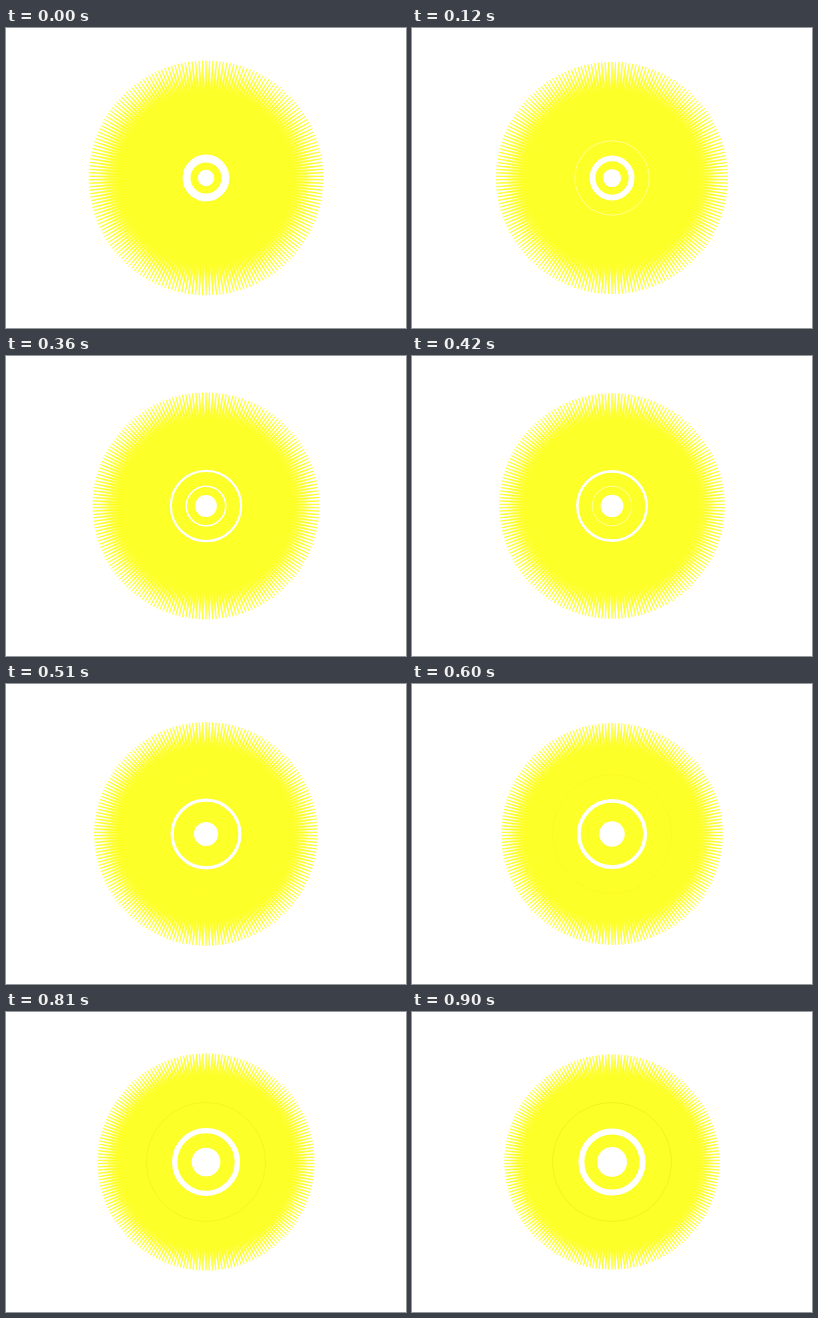
An HTML page with a canvas that plays this animation: 400x300 px, repeating every 0.93 s.

```html
<!DOCTYPE html>
<html lang="en">
<head>
<meta charset="utf-8">
<title>Yellow burst</title>
<style>
html, body { margin: 0; width: 100%; height: 100%; overflow: hidden; background: #fff; }
canvas { display: block; width: 400px; height: 300px; }
</style>
</head>
<body>
<canvas id="stage" width="400" height="300"></canvas>
<script>
const ctx = document.getElementById('stage').getContext('2d');
const YELLOW = '#fdff28';
const LOOP = 930, STEP = 30, HOLD = 300;
const SPIKES = 210, VALLEY = 86;

function disc(r, color) {
  ctx.fillStyle = color;
  ctx.beginPath();
  ctx.arc(0, 0, r, 0, Math.PI * 2);
  ctx.fill();
}

function ring(inner, outer, color) {
  if (outer <= inner) return;
  ctx.strokeStyle = color;
  ctx.lineWidth = outer - inner;
  ctx.beginPath();
  ctx.arc(0, 0, (inner + outer) / 2, 0, Math.PI * 2);
  ctx.stroke();
}

// A many-pointed star: long thin spikes around a solid core.
function burst(rim) {
  const turn = Math.PI / SPIKES;
  ctx.beginPath();
  for (let i = 0; i < SPIKES * 2; i++) {
    const r = i % 2 ? VALLEY : rim;
    ctx.lineTo(r * Math.sin(i * turn), -r * Math.cos(i * turn));
  }
  ctx.closePath();
  ctx.fillStyle = ctx.strokeStyle = YELLOW;
  ctx.lineWidth = 0.7;
  ctx.lineJoin = 'bevel';
  ctx.fill();
  ctx.stroke();
}

// Every radius drifts at a steady rate over the loop; p runs from 0 to 1.
function draw(p) {
  const mix = (from, to) => from + (to - from) * p;
  ctx.setTransform(1, 0, 0, 1, 0, 0);
  ctx.fillStyle = '#fff';
  ctx.fillRect(0, 0, 400, 300);
  ctx.translate(200, 150);
  burst(mix(117.3, 107.6));
  ring(59, 60, `rgba(222, 226, 20, ${Math.max(0, mix(-0.4, 0.4))})`);
  ring(mix(38.4, 27.6), mix(38, 33.6), '#fff');
  ring(mix(15.5, 24.1), mix(23.4, 16.2), '#fff');
  disc(mix(8.2, 15), '#fff');
}

function tick() {
  let t = Math.floor(performance.now() % LOOP / STEP) * STEP;
  if (t === HOLD) t -= STEP;
  draw(t / (LOOP - STEP));
  requestAnimationFrame(tick);
}
tick();
</script>
</body>
</html>
```
